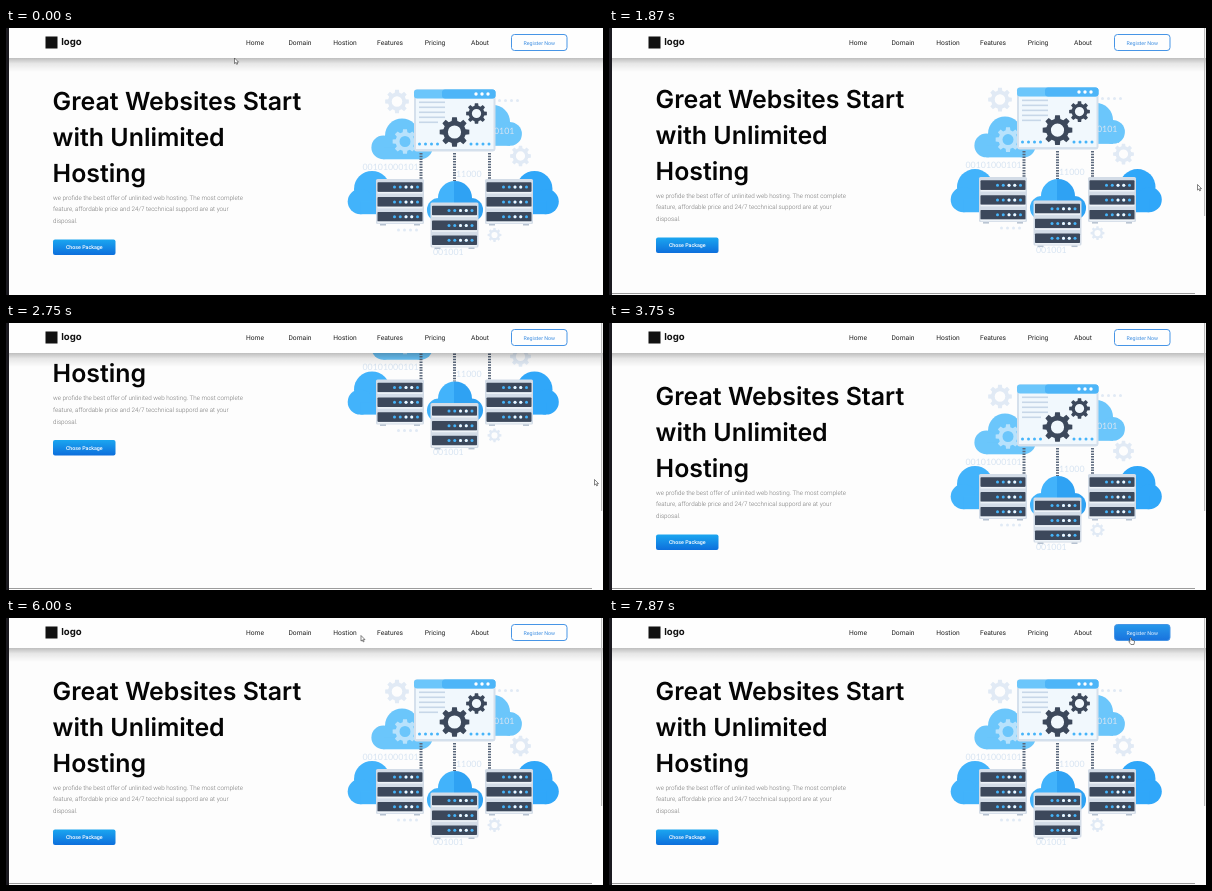
Write an HTML page that moves like this. It is 597 by 267 pixels and loops after 8000 ms.

```html
<!DOCTYPE html>
<html lang="en">
<head>
<meta charset="utf-8">
<title>Hosting landing page</title>
<style>
  html, body { margin: 0; width: 100%; height: 100%; overflow: hidden; background: #fdfdfd; }
  svg { display: block; width: 597px; height: 267px; }
  text { font-family: Roboto, Arial, sans-serif; text-rendering: geometricPrecision; }
  .title text { font: 600 24.9px Inter, sans-serif; fill: #050505; }
  .intro text { font-size: 6.27px; font-weight: 300; fill: #777; }
  .nav text { font-size: 6.7px; fill: #222; text-anchor: middle; }
  .brand { font: 700 9.6px Inter, sans-serif; fill: #111; }
  .label { font-size: 5.3px; text-anchor: middle; }
  .digits text { font-family: Lato, sans-serif; font-size: 8.8px; fill: #d7e4f2; }
</style>
</head>
<body>
<svg viewBox="0 0 597 267" xmlns="http://www.w3.org/2000/svg">
  <defs>
    <linearGradient id="blue" x1="0" y1="0" x2="0" y2="1">
      <stop offset="0" stop-color="#1ba6f0"/><stop offset="1" stop-color="#0d6fdc"/>
    </linearGradient>
    <linearGradient id="hoverBlue" x1="0" y1="0" x2="0" y2="1">
      <stop offset="0" stop-color="#2798ea"/><stop offset="1" stop-color="#1973de"/>
    </linearGradient>
    <linearGradient id="shade" x1="0" y1="0" x2="0" y2="1">
      <stop offset="0" stop-color="#000" stop-opacity=".25"/>
      <stop offset=".4" stop-color="#000" stop-opacity=".09"/>
      <stop offset="1" stop-color="#000" stop-opacity="0"/>
    </linearGradient>
    <linearGradient id="twoTone" gradientUnits="userSpaceOnUse" x1="421" y1="0" x2="477" y2="0">
      <stop offset=".48" stop-color="#42b3fb"/><stop offset=".48" stop-color="#2fa2f3"/>
    </linearGradient>
  </defs>
  <rect width="597" height="267" fill="#fdfdfd"/>
  <g id="page">
    <g class="title" id="title"></g>
    <g class="intro" id="intro"></g>
    <rect x="47" y="211.5" width="62.5" height="15.5" rx="2" fill="url(#blue)"/>
    <text class="label" x="78.3" y="221.2" fill="#fff" font-weight="500">Chose Package</text>
    <g id="art"></g>
  </g>
  <rect x="3" y="30" width="594" height="14" fill="url(#shade)"/>
  <rect x="3" width="594" height="30" fill="#fefefe"/>
  <rect x="39.5" y="8.5" width="12" height="12" fill="#111"/>
  <text class="brand" x="55.2" y="17.3">logo</text>
  <g class="nav" id="nav"></g>
  <rect id="button" x="505.5" y="6.5" width="55.5" height="16" rx="3" stroke="#4795e6"/>
  <text id="buttonText" class="label" x="533.3" y="16.5">Register Now</text>
  <g id="edges">
    <rect x="3" y="265" width="583" height="1" fill="#9b9b9b"/>
    <rect x="595" width="1.2" height="188" fill="#bdbdbd"/>
  </g>
  <rect width="3" height="267" fill="#1b1a20"/>
  <g id="cursor" fill="#fff" stroke="#333" stroke-width=".6" stroke-linejoin="round">
    <path id="arrow" d="M0 0V5.6L1.3 4.5 2.2 6.4 3.1 6 2.3 4.1H4Z"/>
    <path id="hand" d="M0 .6Q.7-.3 1.3.6V2.6L4 3.2Q4.7 3.4 4.5 4.6L3.9 7H.9L-1.2 4.3Q-1 3.3 0 4Z"/>
  </g>
</svg>
<script>
const $ = id => document.getElementById(id);
const dark = '#3c485b', pale = '#e1eaf5', sky = '#6bc6fb', blue = '#45b4fa';

const repeat = (n, make) => Array.from({ length: n }, (_, i) => make(i)).join('');
const text = (s, x, y) => `<text x="${x}" y="${y}">${s}</text>`;
const rect = (x, y, w, h, fill, r = 0) =>
  `<rect x="${x}" y="${y}" width="${w}" height="${h}" rx="${r}" fill="${fill}"/>`;
const dot = (x, y, r, fill) => `<circle cx="${x}" cy="${y}" r="${r}" fill="${fill}"/>`;
const row = (x, y, n, fill, r = 1.5, gap = 6) => repeat(n, i => dot(x + i * gap, y, r, fill));

// Eight trapezoid teeth around a hole
function gear(x, y, r, fill, hole = r * .44) {
  const teeth = 8;
  const outline = repeat(teeth * 4, i => {
    const side = i % 4, outer = side === 1 || side === 2;
    const shift = (side < 2 ? -1 : 1) * (outer ? .2 : .32);
    const a = (Math.floor(i / 4) + shift) * 2 * Math.PI / teeth;
    const d = outer ? r : r * .76;
    return `${i ? 'L' : 'M'}${x + d * Math.sin(a)} ${y - d * Math.cos(a)}`;
  });
  const ring = `M${x - hole} ${y}a${hole} ${hole} 0 1 0 ${2 * hole} 0a${hole} ${hole} 0 1 0 ${-2 * hole} 0Z`;
  return `<path d="${outline}Z${ring}" fill="${fill}" fill-rule="evenodd"/>`;
}

// A large circle between two smaller ones on a flat base
function cloud(x, y, r, spread, fill) {
  const lobe = r * .7, side = r * spread;
  return dot(x, y, r, fill) + dot(x - side, y + lobe, lobe, fill) +
    dot(x + side, y + lobe, lobe, fill) + rect(x - side, y + lobe, side * 2, lobe, fill);
}

function server(x, y) {
  const slab = i => {
    const top = y + 3.3 + i * 14.8, mid = top + 4.8;
    return rect(x + 1.5, top, 45, 9.6, dark, .8) + rect(x + 1.5, top + 9.6, 45, 1.6, '#eef3f8') +
      row(x + 18.5, mid, 5, blue, 1.5, 5.75) + row(x + 30, mid, 2, '#f4f8fc', 1.5, 5.75);
  };
  return rect(x, y, 48, 45, '#d3dce7', 1.5) + rect(x + 4, y + 45, 6, 1.5, '#b5c1d0') +
    rect(x + 38, y + 45, 6, 1.5, '#b5c1d0') + repeat(3, slab);
}

const cable = x =>
  `<path d="M${x} 125V153" stroke="#59677b" stroke-width="3" stroke-dasharray="1.5 1.2"/>`;

const browser = () =>
  rect(408, 61.5, 81.5, 62, '#d5e0ec', 3) + rect(410, 70, 77.5, 51, '#f1f8fd') +
  rect(408, 61.5, 81.5, 9, sky, 3) + rect(436, 61.5, 53.5, 9, '#4db5f8', 3) +
  row(470, 66, 3, '#fff', 1.7) +
  repeat(5, i => rect(413, 73.5 + i * 5, i < 4 ? 26 : 19, 1.6, '#c7d7e8')) +
  row(413.5, 116, 4, blue) + row(465, 116, 4, blue) +
  gear(448.5, 104, 15, dark) + gear(470.5, 85.5, 10.5, dark);

$('title').innerHTML = ['Great Websites Start', 'with Unlimited', 'Hosting']
  .map((s, i) => text(s, 46.6, 82 + i * 36)).join('');
$('intro').innerHTML = [
  'we profide the best offer of unlinited web hosting. The most complete',
  'feature, affordable price and 24/7 tecchnical suppord are at your',
  'disposal.'
].map((s, i) => text(s, 47, 171.6 + i * 11.8)).join('');
$('nav').innerHTML = ['Home', 'Domain', 'Hostion', 'Features', 'Pricing', 'About']
  .map((s, i) => text(s, 249 + i * 45, 17.3)).join('');

$('art').innerHTML =
  gear(391, 73.5, 12, pale) + gear(514.5, 128, 10.5, pale) + gear(488.5, 207, 7, pale) +
  row(493.5, 72.5, 4, pale) + row(392.5, 202, 4, pale) +
  cloud(396, 107.5, 17, 1.1, sky) + cloud(487, 94, 17, 1, sky) +
  gear(399, 113.5, 12.5, '#b8e2fc') +
  `<g class="digits">${text('00101000101', 356.5, 142)}${text('0101', 488, 106)}` +
  `${text('11000', 450, 148.5)}${text('001001', 427, 226.5)}</g>` +
  browser() + cable(415) + cable(448.5) + cable(483.5) +
  cloud(366, 161, 18, .65, '#42b3fb') + cloud(528.5, 161, 18, .65, '#30a7f9') +
  server(370, 151) + server(479, 151) +
  cloud(449, 170, 17, .95, 'url(#twoTone)') + server(424.5, 174.5);

const loop = 8000, step = 125;

// Progress of one eased move, from 0 to 1
function ease(t, start, length) {
  const p = Math.min(1, Math.max(0, (t - start) / length));
  return p * p * (3 - 2 * p);
}

const scrollAt = t => 98.5 * (ease(t, 1850, 300) - ease(t, 2714, 300));

// Each move: start, length, end point
const moves = [
  { start: 250, length: 1000, to: [588.5, 156.5] },
  { start: 2850, length: 500, to: [560, -14] },
  { start: 3750, length: 400, to: [527, 17] },
  { start: 5375, length: 600, to: [355, 17.5] },
  { start: 6250, length: 1500, to: [521, 19.5] }
];

const cursorAt = t => moves.reduce(([x, y], m) => {
  const p = ease(t, m.start, m.length);
  return [x + (m.to[0] - x) * p, y + (m.to[1] - y) * p];
}, [228.5, 30]);

function draw(now) {
  const t = Math.floor((now % loop + 5) / step) * step % loop;
  const [x, y] = cursorAt(t);
  const over = x > 505 && x < 561 && y > 6 && y < 23;
  $('page').setAttribute('transform', `translate(0 ${-scrollAt(t)})`);
  $('cursor').setAttribute('transform', `translate(${x} ${y})`);
  $('arrow').style.display = over ? 'none' : '';
  $('hand').style.display = over ? '' : 'none';
  $('button').setAttribute('fill', over ? 'url(#hoverBlue)' : '#fefefe');
  $('buttonText').setAttribute('fill', over ? '#e8f3ff' : '#3f8fe2');
  $('edges').style.display = t >= 1000 ? '' : 'none';
}

const start = performance.now();
function tick() {
  draw(performance.now() - start);
  requestAnimationFrame(tick);
}
tick();
</script>
</body>
</html>
```
